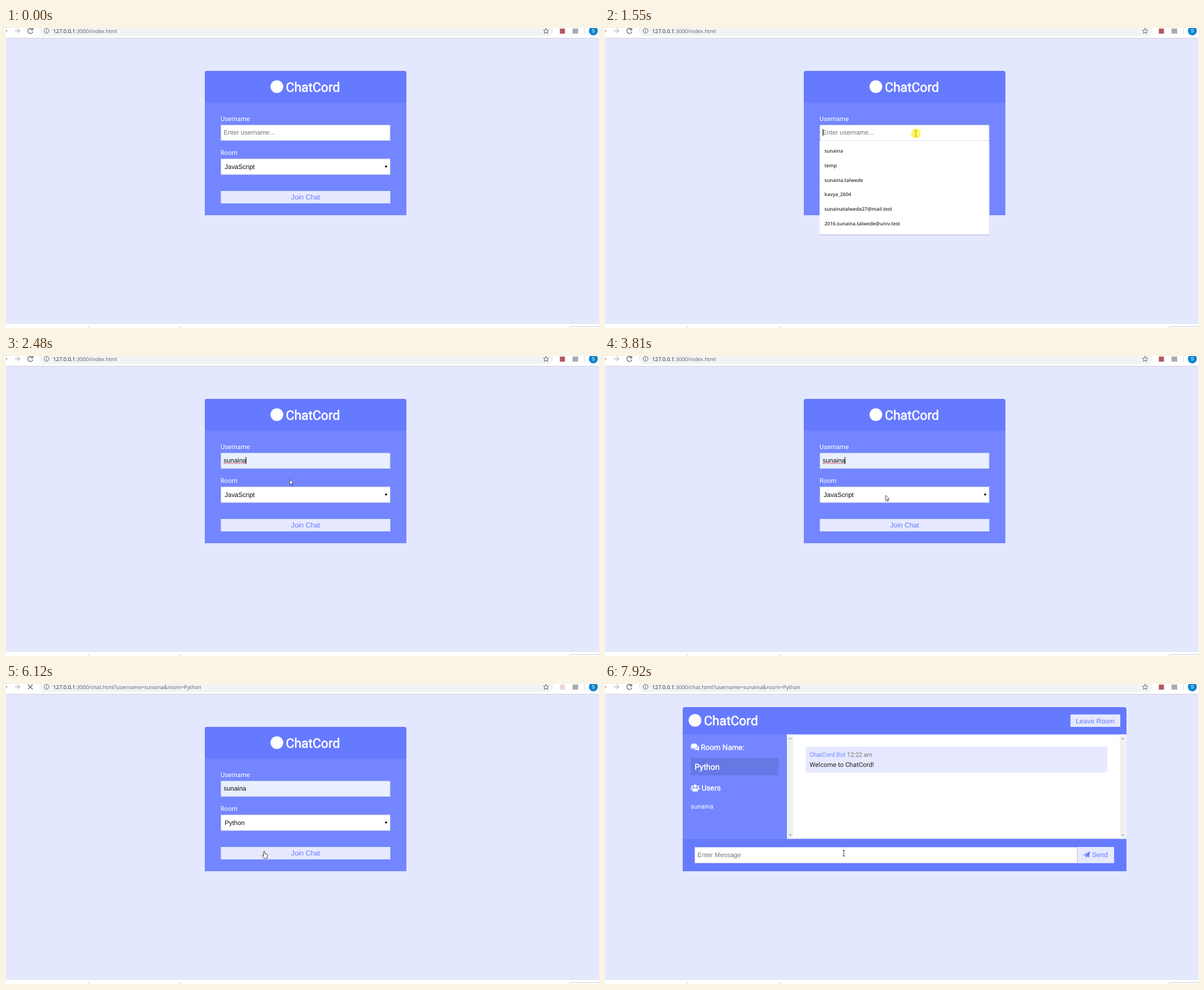
An HTML page for the animation above (8 s loop, 1053 px wide and 532 px high).

```html
<!DOCTYPE html>
<html lang="en">
<head>
<meta charset="utf-8">
<title>Chat room</title>
<style>
  html, body { margin: 0; height: 100%; overflow: hidden; }
  svg { display: block; width: 100vw; height: 100vh; text-rendering: geometricPrecision; }
  .ui { font: 11.46px "Liberation Sans", Arial, sans-serif; }
  .page { font: 11.46px Roboto, sans-serif; fill: #fff; }
  .btn { font: 12.17px "Liberation Sans", Arial, sans-serif; fill: #667aff; }
  .url { font: 9.4px "Open Sans", sans-serif; fill: #5f6368; }
  .hint { font: 600 8.65px "Open Sans", sans-serif; fill: #333; }
  .bold { stroke: currentColor; stroke-width: .03em; color: #fff; }
  .h1 { font-size: 22.9px; }
  .h3 { font-size: 13.4px; }
  .head { fill: #667aff; }
  .side { fill: #7386ff; }
  .pale { fill: #e6e9ff; }
  .grey { fill: #757575; }
  .icon { fill: none; stroke: #5f6368; stroke-width: 1.3; }
  .field { fill: #fff; stroke: #b9c0e6; stroke-width: .8; }
</style>
</head>
<body>
<svg viewBox="0 0 1053 532" preserveAspectRatio="none">
  <rect width="1053" height="532" fill="#e4e8fe"/>

  <g id="browser">
    <rect width="1053" height="18" fill="#fff"/>
    <path d="M0 18.2H1053" stroke="#c3c7d6" stroke-width=".9"/>
    <rect x="59" y="-10" width="913" height="24.5" rx="12" fill="#f1f3f4"/>
    <path class="icon" d="M-4 5H2"/>
    <path class="icon" d="M16 5H24.5M20.5 1L24.5 5L20.5 9" style="stroke:#b9bcc0"/>
    <path class="icon" id="reload" d="M46.6 2.2A4.5 4.5 0 1 0 47.7 6.2M47.6 -.5V3.4H43.7"/>
    <path class="icon" id="stop" d="M39 1L47.3 9.3M47.3 1L39 9.3"/>
    <circle class="icon" cx="72" cy="5" r="4.2" style="stroke-width:1"/>
    <path class="icon" d="M72 4.5V7.5M72 2.4V3.5" style="stroke-width:1"/>
    <text class="url" x="83.5" y="8.7"><tspan fill="#202124">127.0.0.1</tspan>:3000/<tspan id="path"></tspan></text>
    <path class="icon" d="M959 .6L960.4 3.7 963.7 4 961.2 6.2 962 9.5 959 7.7 956 9.5 956.8 6.2 954.3 4 957.6 3.7Z" style="stroke-width:1"/>
    <rect id="badge" x="983.5" y="1" width="9" height="9" fill="#b4595f"/>
    <rect x="1006" y="1" width="10" height="9" fill="#a9acb0"/>
    <path d="M1027.5 0V11" stroke="#d0d3d8"/>
    <circle cx="1043" cy="5" r="8" fill="#0b84d0"/>
    <text class="page" x="1043" y="8.3" text-anchor="middle" style="font-size:9px">S</text>
    <rect y="524" width="1053" height="8" fill="#fff"/>
    <path d="M0 524.3H1053" stroke="#d5d8e2" stroke-width=".6"/>
    <path d="M146.5 529V532M309.5 529V532M1000.5 533Q1000.5 529.5 1004 529.5H1053" fill="none" stroke="#ccc"/>
  </g>

  <g id="join">
    <path class="side" d="M353 132H711V332H353Z"/>
    <path class="head" d="M353 132.5V80Q353 76 357 76H707Q711 76 711 80V132.5Z"/>
    <circle cx="481" cy="104" r="11.3" fill="#fff"/>
    <text class="page bold h1" x="497" y="112.5">ChatCord</text>
    <text class="page" x="381" y="165">Username</text>
    <rect class="field" id="nameBox" x="381.7" y="172" width="300.4" height="27.6"/>
    <text class="ui" id="nameText" x="386.5" y="189"></text>
    <path id="squiggle" d="M386.5 190.6H426" stroke="#e0373c" stroke-width="1" stroke-dasharray="1.6 .5"/>
    <path id="caret" stroke="#000" stroke-width="1"/>
    <text class="page" x="381" y="225">Room</text>
    <rect class="field" x="381.7" y="232" width="300.4" height="28"/>
    <text class="ui" id="roomText" x="388.3" y="250" fill="#111"></text>
    <path d="M672.6 244.3H677.4L675 248.3Z"/>
    <rect class="pale" x="381.5" y="289" width="301" height="22"/>
    <text class="btn" x="532" y="303.5" text-anchor="middle">Join Chat</text>

    <g id="hints" class="hint">
      <rect x="381" y="200.4" width="302" height="167" rx="3" fill="#5560a0" opacity=".35"/>
      <rect x="381" y="199.5" width="301.5" height="166.8" rx="2" fill="#fff"/>
      <rect id="hintHover" x="381" y="205" width="301.5" height="25.8" fill="#e9e9ec"/>
    </g>

    <g id="options" class="ui">
      <rect x="382" y="260" width="300" height="86" fill="#fff"/>
      <path d="M382 346V260H682V346" fill="none" stroke="#5b8fd8" stroke-width=".8"/>
      <rect id="optHover" x="382.5" width="299" height="14.4" fill="#1e90ff"/>
    </g>
  </g>

  <g id="chat">
    <path class="head" d="M138 332V45Q138 41 142 41H922Q926 41 926 45V332Z"/>
    <circle cx="159.8" cy="64.5" r="11.3" fill="#fff"/>
    <text class="page bold h1" x="175.7" y="73">ChatCord</text>
    <rect class="pale" x="826.5" y="54" width="88.5" height="22"/>
    <text class="btn" x="870.5" y="69.5" text-anchor="middle">Leave Room</text>

    <rect class="side" x="138" y="89.5" width="185" height="185.5"/>
    <g fill="#fff">
      <path d="M158 105.5C162 105.5 164 107.5 164 110S162 114.3 158 114.3L155.5 114 152.3 115.5 153.3 112.8C151 109 153.5 105.5 158 105.5Z"/>
      <path d="M165 109C167.6 110.8 167.8 113.5 166.4 115.3L167.4 118 163.6 116.8Q160 117.3 157.6 115.4C162.5 115.5 165.3 113 165 109Z"/>
      <circle cx="160" cy="181.2" r="2.9"/>
      <path d="M155 190.5V188Q155.5 185 158 185H162Q164.7 185 165 188V190.5Z"/>
      <circle cx="154.6" cy="181.7" r="1.7"/><circle cx="165.6" cy="181.7" r="1.7"/>
      <path d="M152 187V185.6Q152.5 184 154 184H156.3L154.4 187ZM168.3 187V185.6Q168 184 166.5 184H164L165.8 187Z"/>
    </g>
    <text class="page bold h3" x="170" y="116.5">Room Name:</text>
    <rect x="152" y="131" width="156" height="31" opacity=".1"/>
    <text class="page bold" x="159" y="152" style="font-size:14.3px">Python</text>
    <text class="page bold h3" x="171.5" y="189.3">Users</text>
    <text class="page" x="152" y="221">sunaina</text>

    <rect x="323" y="89.5" width="603" height="185" fill="#fff"/>
    <path d="M323 89.5H334V274.5H323ZM914 89.5H926V274.5H914Z" fill="#f1f1f1"/>
    <path d="M326.5 98H331.5L329 95ZM326.5 266.5H331.5L329 269.5ZM917 98H922L919.5 95ZM917 266.5H922L919.5 269.5Z" fill="#a3a3a3"/>
    <rect class="pale" x="356.5" y="111" width="535.5" height="46" rx="3.6"/>
    <g class="page" style="font-size:10.74px" opacity=".75">
      <text class="bold" x="363" y="128.5" style="fill:#7386ff;color:#7386ff">ChatCord Bot</text>
      <text class="bold" x="430" y="128.5" style="fill:#777;color:#777">12:22 am</text>
    </g>
    <text class="page" x="363.3" y="147.3" style="fill:#222">Welcome to ChatCord!</text>

    <rect class="field" x="159.5" y="289.5" width="679" height="28"/>
    <text class="ui grey" x="164.3" y="307">Enter Message</text>
    <rect class="pale" x="839" y="289" width="65" height="28.7"/>
    <path class="head" d="M861.3 296.8L859.6 307.3 855.8 305.7 854 308.5 853.5 304.8 859 299.2 852.2 304.3 849.5 303.2Z"/>
    <text class="btn" x="864.7" y="307">Send</text>
  </g>

  <g id="cursor">
    <path id="arrow" d="M0 0V9.4L2.2 7.5 3.8 11 5.3 10.3 3.8 7H6.8Z" fill="#fff" stroke="#222" stroke-width=".8"/>
    <path id="beam" d="M-2.3-5H2.3M0-5V5M-2.3 5H2.3" stroke="#222" stroke-width=".9"/>
    <path id="hand" d="M-1.2 1Q0-.8 1.2 1V4.5L4.6 5.4Q6 5.8 6 7.5L5.2 10.4V12.6H-.4L-3.4 8.4Q-3.6 6.6-2.3 7L-1.2 8.2Z" fill="#fff" stroke="#222" stroke-width=".9"/>
  </g>
  <circle id="click" r="8.7" fill="#fff000" opacity=".6"/>
</svg>

<script>
const LOOP = 8000, NAME = 'sunaina';
const el = id => document.getElementById(id);
const show = (id, on) => el(id).style.display = on ? '' : 'none';
const within = (t, a, b) => t >= a && t < b;

const addText = (group, text, x, y) => {
  const node = document.createElementNS('http://www.w3.org/2000/svg', 'text');
  node.textContent = text;
  node.setAttribute('x', x);
  node.setAttribute('y', y);
  return group.appendChild(node);
};
[NAME, 'temp', NAME + '.talwede', 'kavya_2604', NAME + 'talwede27@mail.test', '2016.' + NAME + '.talwede@univ.test']
  .forEach((s, i) => addText(el('hints'), s, 389.7, 221 + i * 25.8));
const options = ['JavaScript', 'Python', 'PHP', 'C#', 'Ruby', 'Java']
  .map((s, i) => addText(el('options'), s, 389, 270 + i * 14.35));

// Pointer: time, x, y, shape from that time on
const track = [
  [150, 809, 363, 'arrow'], [300, 626, 284, 'arrow'], [420, 626, 284, 'arrow'],
  [1090, 560, 198, 'beam'], [1240, 552, 187, 'beam'], [1720, 552, 187, 'beam'],
  [1870, 538, 200, 'arrow'], [2250, 504, 219, 'arrow'], [2560, 504, 219, 'arrow'],
  [3180, 502, 252, 'arrow'], [3480, 500, 263, 'arrow'], [3810, 498, 247, 'arrow'],
  [4050, 498, 247, 'arrow'], [4500, 462, 275, 'arrow'], [4660, 445, 287, 'arrow'],
  [4810, 438.5, 281, 'arrow'], [5350, 438.5, 281, 'arrow'], [5600, 450, 290, 'hand'],
  [5810, 458.7, 296.5, 'hand'], [7070, 458.7, 296.5, 'arrow'], [7220, 489, 264, 'arrow'],
  [7300, 489, 264, 'arrow'], [7460, 455, 280, 'beam'], [7540, 433.5, 294, 'beam'],
  [7770, 433.5, 294, 'beam'], [7920, 424, 300, 'beam'], [LOOP, 424, 300, 'beam']
];

function pointer(t) {
  const i = Math.max(0, track.findIndex(k => k[0] > t) - 1);
  const [t0, x0, y0, shape] = track[i], [t1, x1, y1] = track[i + 1];
  const p = Math.max(0, (t - t0) / (t1 - t0));
  return { x: x0 + (x1 - x0) * p, y: y0 + (y1 - y0) * p, shape: t >= 6210 && t < 7140 ? 'hand' : shape };
}

function draw(t) {
  const sent = t >= 6120, inChat = t >= 6210, loading = within(t, 6120, 6290);
  const hovering = within(t, 1870, 2480), named = t >= 1870;
  const { x, y, shape } = pointer(t);

  el('path').textContent = sent ? `chat.html?username=${NAME}&room=Python` : 'index.html';
  show('reload', !loading);
  show('stop', loading);
  el('badge').style.opacity = loading ? .25 : 1;
  show('join', !inChat);
  show('chat', inChat);

  el('nameBox').style.fill = named ? '#e8f0fe' : '#fff';
  el('nameText').textContent = named ? NAME : 'Enter username...';
  el('nameText').style.fill = named ? '#111' : '#757575';
  show('squiggle', within(t, 2480, 3960));
  const blinkStart = t < 2400 ? 1470 : 2400;
  show('caret', within(t, 1470, 3960) && !hovering | t >= 2480 && (t - blinkStart) % 1060 < 530);
  el('caret').setAttribute('d', `M${named ? 426.2 : 387} 179V191.5`);
  el('roomText').textContent = t < 5190 ? 'JavaScript' : 'Python';

  show('hints', within(t, 1550, 2480));
  show('hintHover', hovering);
  show('options', within(t, 3960, 5190));
  const row = y < 274.35 ? 0 : 1;
  el('optHover').setAttribute('y', 260 + row * 14.35);
  options.forEach((o, i) => o.style.fill = i === row ? '#fff' : '#111');

  show('cursor', t >= 150);
  ['arrow', 'beam', 'hand'].forEach(s => show(s, s === shape));
  const at = `translate(${x} ${y})`;
  el('cursor').setAttribute('transform', at);
  el('click').setAttribute('transform', at);
  show('click', within(t, 1470, 1620) || within(t, 2400, 2480) || within(t, 3960, 4110) ||
    within(t, 4960, 5190) || within(t, 5810, 6120));
}

const start = performance.now();
(function tick() {
  draw((performance.now() - start) % LOOP);
  requestAnimationFrame(tick);
})();
</script>
</body>
</html>
```
